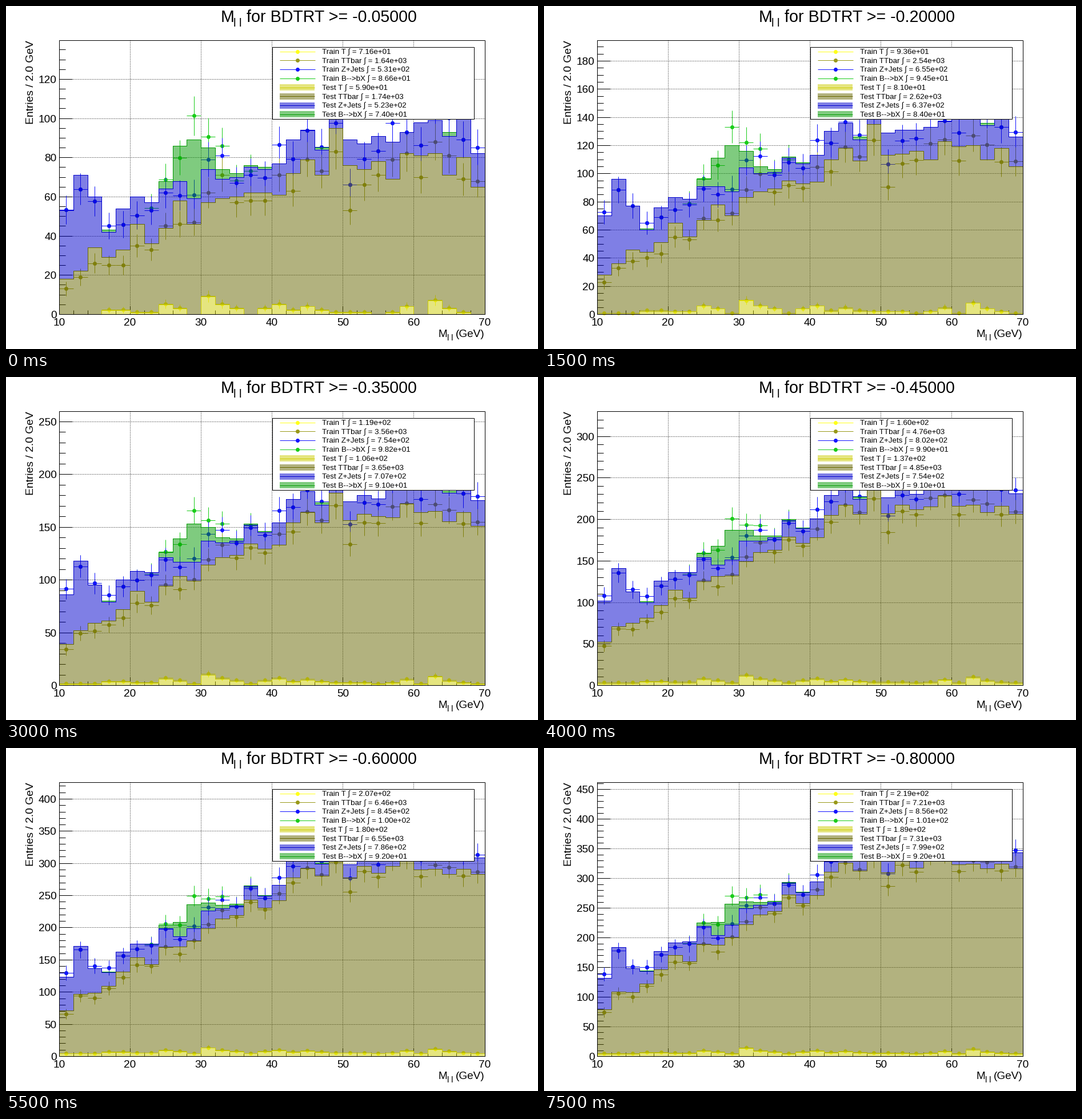
Write a matplotlib script that moves like this. It is 931x601 px and loops after 8000 ms.

```python
import numpy as np
import matplotlib.pyplot as plt
from matplotlib.animation import FuncAnimation
from matplotlib.collections import LineCollection
from matplotlib.patches import Rectangle

W, H, DPI = 931, 601, 64
PX = 72 / DPI
LEFT, RIGHT, TOP, BOTTOM = 93, 837.5, 60, 540
STEPS, BINS = 16, 30
plt.rcParams["font.family"] = "Liberation Sans"

NAMES = ["T", "TTbar", "Z+Jets", "B-->bX"]
POINT_COLORS = ["#ffff1a", "#99991a", "#1414ff", "#1acc1a"]
FILL_COLORS = ["#cccc00", "#666600", "#0000cc", "#009900"]

# Integrals and axis range, known at a few cuts and interpolated between
KEYS = [0, 2, 4, 6, 8, 11, 15]
Y_MAX = [139.8, 176.3, 212.9, 259.5, 330, 425.7, 462]
TRAIN_SUM = [
    [71.6, 86.2, 101, 119, 160, 207, 219],
    [1640, 2250, 2820, 3560, 4760, 6460, 7210],
    [531, 620, 690, 754, 802, 845, 856],
    [86.6, 92.6, 96.4, 98.2, 99, 100, 101],
]
TEST_SUM = [
    [59, 71, 91, 106, 137, 180, 189],
    [1740, 2320, 2910, 3650, 4850, 6550, 7310],
    [523, 612, 662, 707, 754, 786, 799],
    [74, 81, 87, 91, 91, 92, 92],
]

# TTbar on top of T at the tightest cut, and the gain up to the loosest
TEST_TT = [18, 22, 34, 29, 33, 46, 36, 44, 58, 46, 57, 59, 60, 62, 62,
           61, 72, 79, 71, 95, 76, 74, 78, 69, 82, 81, 82, 71, 80, 65]
TRAIN_TT = [13, 19, 26, 25, 25, 35, 33, 45, 46, 47, 62, 71, 57, 58, 58,
            71, 63, 79, 73, 83, 53, 66, 71, 79, 82, 70, 88, 81, 69, 68]
GAIN = [61, 87, 74, 93, 113, 124, 124, 145, 130, 154, 165, 180, 184, 210, 196,
        210, 239, 247, 242, 253, 234, 256, 240, 262, 262, 242, 242, 246, 244, 252]

# Shapes of the smaller processes
T_BASE = [0, 0, 0, 2, 2, 1, 1, 5, 3, 0, 9, 5, 3, 0, 3,
          5, 2, 4, 2, 1, 1, 1, 0, 1, 4, 0, 7, 3, 1, 0]
Z_TAIL = [22, 13, 13, 17, 15, 20, 21, 19, 16, 19,
          17, 17, 16, 24, 14, 21, 21, 25, 26, 22]
TEST_Z = [44, 62, 33, 17, 26, 18, 27, 25, 13, 17] + Z_TAIL
TRAIN_Z = [52, 58, 41, 26, 27, 20, 26, 22, 19, 18] + Z_TAIL
TEST_B = np.zeros(BINS)
TEST_B[6:15] = 0, 5, 21, 34, 12, 5, 2, 1, 1
TEST_B[[3, 18, 27]] = 1, 2, 2
TRAIN_B = np.zeros(BINS)
TRAIN_B[6:15] = 1, 7, 20, 42, 12, 5, 1, 2, 0


def at_step(step, values):
    if step > 11:  # growth levels off at the end
        step = 11 + 4 * (1 - (1 - (step - 11) / 4) ** 2)
    return np.interp(step, KEYS, values)


def stack(step, sums, tt, z, b):
    """Cumulative bin contents of the four processes."""
    n_t, n_tt, n_z, n_b = [at_step(step, s) for s in sums]
    t = np.maximum(np.add(T_BASE, (n_t - sum(T_BASE)) / BINS), 0)
    first, last = sums[1][0], sums[1][-1]
    top = tt + (n_tt - first) / (last - first) * np.array(GAIN)
    z_top = top + n_z * np.array(z) / sum(z)
    return [t, top, z_top, z_top + n_b * b / b.sum()]


def x_px(v):
    return LEFT + (np.asarray(v) - 10) / 60 * (RIGHT - LEFT)


EDGES = x_px(np.arange(10, 71, 2))
CENTERS = (EDGES[1:] + EDGES[:-1]) / 2
HALF = (EDGES[1] - EDGES[0]) / 2

fig = plt.figure(figsize=(W / DPI, H / DPI), dpi=DPI, facecolor="white")
ax = fig.add_axes([0, 0, 1, 1])
ax.set_xlim(0, W)
ax.set_ylim(H, 0)
ax.axis("off")


def label(x, y, s, size=19, **kw):
    return ax.text(x, y, s, fontsize=size * PX, color="black", zorder=8, **kw)


def lines(segments, color="black", z=1, **kw):
    return ax.add_collection(LineCollection(
        segments, colors=color, linewidths=PX, zorder=z, **kw))


def dots(xs, ys, color, z):
    return ax.plot(xs, ys, "o", color=color, ms=7 * PX, mew=0, zorder=z)[0]


def draw_static():
    lines([[(x, TOP), (x, BOTTOM)] for x in x_px(range(20, 70, 10))],
          linestyles=[(0, (1, 2))])
    lines([[(x_px(v), BOTTOM), (x_px(v), BOTTOM - (7 if v % 10 else 14))]
           for v in range(10, 71, 2)])
    for v in range(10, 71, 10):
        label(x_px(v), 560, str(v), ha="center")
    ax.add_patch(Rectangle((LEFT, TOP), RIGHT - LEFT, BOTTOM - TOP,
                           fill=False, ec="black", lw=PX, zorder=4))

    label(376, 28, "M", 28.6)
    label(398.5, 36, "l l", 20)
    label(757, 580, "M")
    label(772.5, 586, "l l", 14)
    label(838, 580, "(GeV)", ha="right")
    label(48, 60, "Entries / 2.0 GeV", 19.2, ha="right", va="baseline",
          rotation=90, rotation_mode="anchor")

    ax.add_patch(Rectangle((466, 72), 353, 126, fc="white", ec="black",
                           lw=PX, zorder=5))
    for i in range(4):
        y = 79.5 + 15.75 * i
        lines([[(479, y), (541, y)]], POINT_COLORS[i], 6)
        dots([509.5], [y], POINT_COLORS[i], 6)
        y += 63
        ax.add_patch(Rectangle((479, y - 5.5), 61, 11, fc=FILL_COLORS[i],
                               alpha=.5, lw=0, zorder=6))
        lines([[(479, y), (540, y)]], FILL_COLORS[i], 6)


draw_static()
title = label(421, 28, "", 28.6)
entries = [label(553, 84 + 15.75 * i, "", 13.4) for i in range(8)]
moving = []


def draw_axis(y_px, y_max):
    major, minor = (20, 5) if y_max < 200 else (50, 10)
    ticks, grid = [], []
    for v in range(0, int(y_max) + 1, minor):
        y = y_px(v)
        ticks.append([(LEFT, y), (LEFT + (11 if v % major else 23), y)])
        if v % major == 0:
            grid.append([(LEFT, y), (RIGHT, y)])
            moving.append(label(88.5, y + 7, str(v), ha="right"))
    moving.append(lines(ticks))
    moving.append(lines(grid[1:], linestyles=[(0, (1, 2))]))


def draw_points(y_px, values, color):
    keep = values > .3
    xs, vs = CENTERS[keep], values[keep]
    ys, err = y_px(vs), np.sqrt(vs)
    bars = [[(x - HALF, y), (x + HALF, y)] for x, y in zip(xs, ys)]
    bars += [[(x, lo), (x, hi)]
             for x, lo, hi in zip(xs, y_px(vs - err), y_px(vs + err))]
    moving.append(lines(bars, color, 2))
    moving.append(dots(xs, ys, color, 2))


def draw_band(y_px, low, high, color):
    xs = np.repeat(EDGES, 2)[1:-1]
    lo, hi = np.repeat(y_px(low), 2), np.repeat(y_px(high), 2)
    moving.append(ax.fill_between(xs, lo, hi, color=color, alpha=.5,
                                  lw=0, zorder=3))
    moving.append(ax.plot(xs, hi, color=color, lw=PX, zorder=3)[0])


def update(step):
    while moving:
        moving.pop().remove()
    y_max = at_step(step, Y_MAX)

    def y_px(v):
        return BOTTOM - np.clip(v, 0, y_max) / y_max * (BOTTOM - TOP)

    draw_axis(y_px, y_max)
    train = stack(step, TRAIN_SUM, TRAIN_TT, TRAIN_Z, TRAIN_B)
    test = np.round(stack(step, TEST_SUM, TEST_TT, TEST_Z, TEST_B))
    for i in reversed(range(4)):
        draw_points(y_px, train[i], POINT_COLORS[i])
    for i in reversed(range(4)):
        low = test[i - 1] if i else np.zeros(BINS)
        draw_band(y_px, low, test[i], FILL_COLORS[i])

    title.set_text(f"for BDTRT >= {-0.05 * (step + 1):.5f}")
    for i, entry in enumerate(entries):
        kind, sums = ("Test", TEST_SUM) if i > 3 else ("Train", TRAIN_SUM)
        total = at_step(step, sums[i % 4])
        entry.set_text(f"{kind} {NAMES[i % 4]} \u222b = {total:.2e}")
    return moving


anim = FuncAnimation(fig, update, frames=STEPS, interval=500, repeat=True,
                     blit=False)
plt.show()
```
